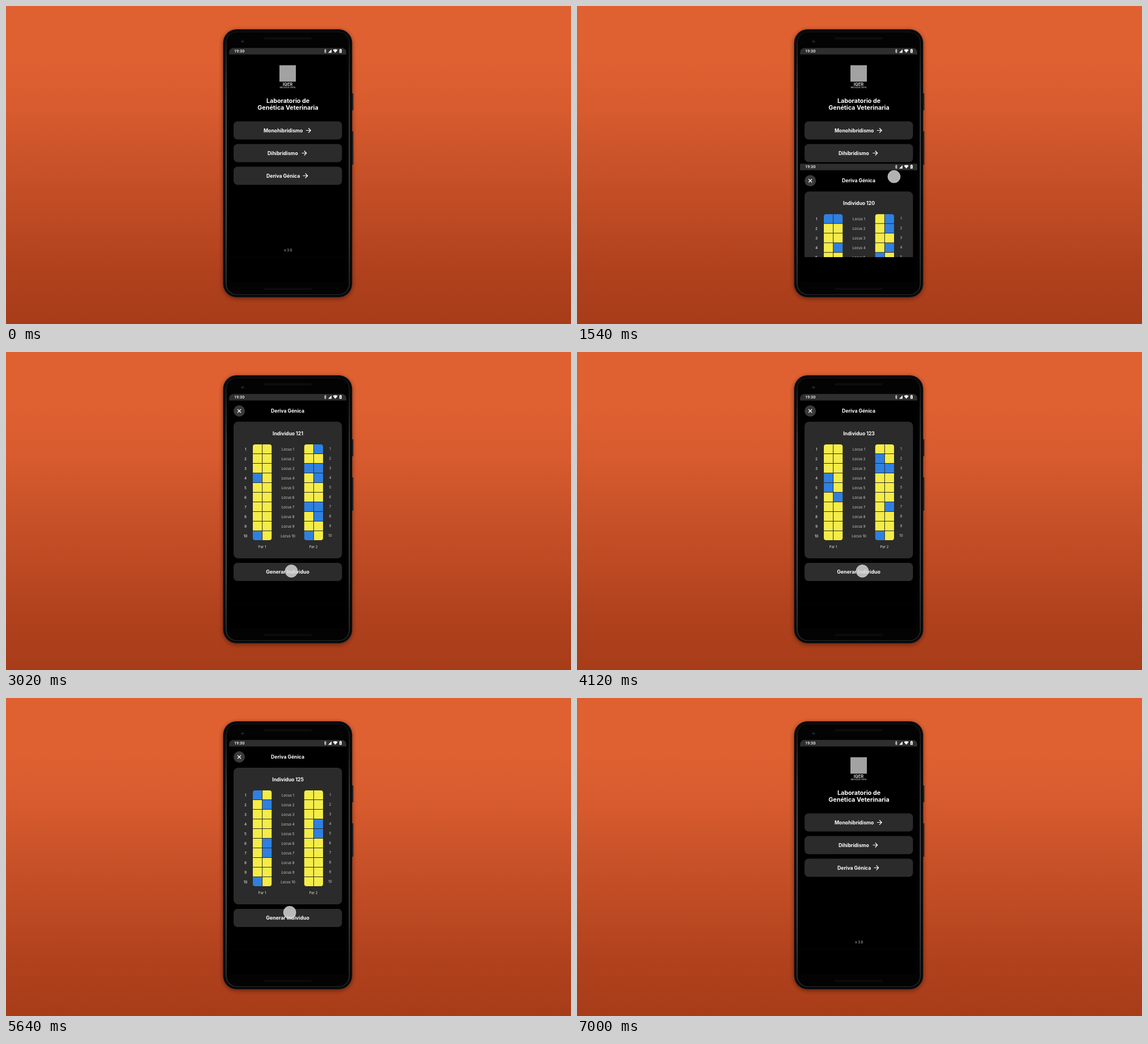
These frames come from a looping animation (998 px wide and 561 px high, 7.76 s). An HTML page with a canvas:

```html
<!DOCTYPE html>
<html lang="es">
<head>
<meta charset="utf-8">
<title>Laboratorio de Genética Veterinaria</title>
<style>
  html, body { margin: 0; width: 100%; height: 100%; overflow: hidden; background: #c24f27; }
  canvas { display: block; width: 998px; height: 561px; }
</style>
</head>
<body>
<canvas></canvas>
<script>
const LOOP = 7760, W = 998, H = 561;
const GREY = '#2b2b2b', YELLOW = '#f4ec48', BLUE = '#2f80e0';
const SCREEN = { x: 394, y: 74, w: 207, h: 369 };

// One digit per locus: 2 = left allele blue, 1 = right allele blue, 3 = both.
const PEOPLE = [
  { at: 0, pairs: ['3001012220', '1101200000'] },
  { at: 2780, pairs: ['0002000002', '1031003102'] },
  { at: 3400, pairs: ['0100200010', '0020100200'] },
  { at: 4000, pairs: ['0002210000', '0230001002'] },
  { at: 4640, pairs: ['1000020100', '0100020010'] },
  { at: 5310, pairs: ['2100011002', '0001100000'] }
];

// Touch path: arrival points, each reached between start and end.
const TOUCH = [
  { from: 340, to: 640, x: 560, y: 301 },
  { from: 2100, to: 2620, x: 504, y: 386.5 },
  { from: 5570, to: 6240, x: 406, y: 105.5 },
  { from: 6720, to: 7000, x: 380, y: 108 }
];

const canvas = document.querySelector('canvas');
const scale = window.devicePixelRatio || 1;
canvas.width = W * scale;
canvas.height = H * scale;
const c = canvas.getContext('2d');

// Cubic bezier (.4, 0, .2, 1), solved by bisection.
function ease(p) {
  if (p <= 0) return 0;
  if (p >= 1) return 1;
  let lo = 0, hi = 1, s;
  for (let i = 0; i < 20; i++) {
    s = (lo + hi) / 2;
    const x = 1.2 * (1 - s) ** 2 * s + 0.6 * (1 - s) * s * s + s ** 3;
    if (x < p) lo = s; else hi = s;
  }
  return 3 * (1 - s) * s * s + s ** 3;
}
const between = (t, from, to) => ease((t - from) / (to - from));

function box(x, y, w, h, r, fill) {
  c.beginPath();
  c.roundRect(x, y, w, h, r);
  c.fillStyle = fill;
  c.fill();
}

function disc(x, y, r, fill) {
  c.beginPath();
  c.arc(x, y, r, 0, 7);
  c.fillStyle = fill;
  c.fill();
}

function stroke(path, color, width) {
  c.strokeStyle = color;
  c.lineWidth = width;
  c.stroke(new Path2D(path));
}

function text(str, x, y, size, weight = 700, color = '#fff', align = 'center', font = 'Inter') {
  c.font = `${weight} ${size}px ${font}, sans-serif`;
  c.textAlign = align;
  c.fillStyle = color;
  c.fillText(str, x, y);
}

function gradient(x0, y0, x1, y1, ...colors) {
  const g = c.createLinearGradient(x0, y0, x1, y1);
  colors.forEach((color, i) => g.addColorStop(i / (colors.length - 1), color));
  return g;
}

function drawPhone() {
  c.fillStyle = gradient(0, 0, 0, H, '#df6132', '#df6132', '#d75b2e', '#c95229', '#bd4a23', '#b0411d', '#a83c19');
  c.fillRect(0, 0, W, H);
  box(610, 154, 3.5, 30, 1, '#20242a');
  box(610, 221, 3.5, 59, 1, '#20242a');
  c.save();
  c.shadowColor = 'rgba(40,10,0,.55)';
  c.shadowBlur = 9 * scale;
  c.shadowOffsetY = 2 * scale;
  box(383.5, 41, 228, 473, 24, '#15171a');
  c.restore();
  box(384.5, 42, 226, 470.5, 23, '#050505');
  box(387.5, 45, 220, 465, 20, gradient(0, 45, 0, 510, '#111', '#3b3d40', '#45474a', '#3b3d40', '#222'));
  box(390, 46.5, 215.5, 462, 18, '#030303');
  box(455, 55, 85, 4, 2, '#0d0d0e');
  box(455, 497.5, 85, 3, 1.5, '#0d0d0e');
  disc(418, 62.5, 3.5, '#080a0d');
  disc(417, 62.5, 1, '#1f5288');
  disc(419.3, 62.8, 0.8, '#1f5288');
  box(394, 74, 207, 413, 8, '#000');
  c.fillStyle = '#080808';
  c.fillRect(394, 442.5, 207, 1);
}

function drawStatusBar() {
  c.fillStyle = '#2e2e2e';
  c.fillRect(394, 74, 207, 11.5);
  text('19:30', 403, 82, 7.2, 500, '#fff', 'left', 'Roboto');
  stroke('M562 77.7l3.6 3.4-1.8 1.7v-6.6l1.8 1.7-3.6 3.4', '#fff', 0.8);
  c.fillStyle = '#fff';
  c.fill(new Path2D('M569 82.5h6v-6z'));
  c.fill(new Path2D('M581.7 82.6l-4.2-5q4.2-2.8 8.4 0z'));
  box(589, 76.6, 4, 6, 0.6, '#fff');
  box(590.2, 75.8, 1.6, 1, 0, '#fff');
  box(590.5, 78.2, 1, 2.8, 0, '#333');
}

function drawHome() {
  drawStatusBar();
  box(483, 104.5, 29, 29, 0, '#a2a2a2');
  text('IQER', 497.5, 140.8, 7.6, 700, '#c8c8c8');
  text('MEZQUILTEPA', 497.5, 145.4, 4, 600, '#b0b0b0');
  text('Laboratorio de', 498, 171, 10.75);
  text('Genética Veterinaria', 498, 183, 10.75);
  [['Monohibridismo', 455, 530], ['Dihibridismo', 462, 522.5], ['Deriva Génica', 460, 524.5]]
    .forEach(([label, x, arrow], i) => {
      const y = 219.5 + 40 * i;
      box(402, y - 16, 191.5, 32, 7, GREY);
      text(label, x, y + 3, 8.7, 700, '#fff', 'left');
      stroke(`M${arrow} ${y}h8.2m-4-4l4 4-4 4`, '#fff', 1.2);
    });
  text('v 3.0', 498.3, 433, 6, 400, '#ccc');
}

function drawPair(x, codes) {
  [...codes].forEach((code, row) => {
    const y = 163 + row * 17;
    for (const side of [0, 1]) {
      const r = [0, 0, 0, 0];
      if (row === 0) r[side] = 4;
      if (row === 9) r[3 - side] = 4;
      box(x + side * 17.1, y, 16.1, 16, r, code & (2 - side) ? BLUE : YELLOW);
    }
  });
}

function drawDrift(t) {
  c.fillStyle = '#000';
  c.fillRect(394, 74, 207, 369);
  drawStatusBar();
  disc(412, 104, 10, '#3a3a3a');
  stroke('M409 101l6 6m0-6l-6 6', '#fff', 1.2);
  text('Deriva Génica', 497.5, 107, 8.65);
  box(402, 123, 191.5, 241, 8, GREY);

  const index = PEOPLE.findLastIndex(p => t >= p.at);
  const person = PEOPLE[index];
  text('Individuo ' + (120 + index), 498, 147.2, 8.6);
  drawPair(436, person.pairs[0]);
  drawPair(526.8, person.pairs[1]);
  for (let i = 1; i <= 10; i++) {
    const y = 156.8 + i * 17;
    text(i, 423, y, 6.3, 500, '#ddd');
    text('Locus ' + i, 498, y, 6.15, 400, '#d0d0d0');
    text(i, 572.5, y - 1, 6.3, 400, '#c4c4c4');
  }
  text('Par 1', 452.5, 346, 6.1, 400, '#ddd');
  text('Par 2', 543, 346, 6.1, 400, '#ddd');

  const age = index ? t - person.at : 999;
  const glow = Math.max(0, 1 - age / 140) * 0.08;
  box(402, 372, 191.5, 32, 7, GREY);
  if (glow) box(402, 372, 191.5, 32, 7, `rgba(255,255,255,${glow})`);
  text('Generar Individuo', 497.5, 391, 8.8);
}

function drawTouch(t) {
  if (t < TOUCH[0].from || t >= TOUCH[3].to) return;
  let x = 612, y = 278;
  for (const move of TOUCH) {
    const p = between(t, move.from, move.to);
    x += (move.x - x) * p;
    y += (move.y - y) * p;
  }
  disc(x, y, 11, 'rgba(218,218,218,.82)');
  c.strokeStyle = 'rgba(235,235,235,.55)';
  c.lineWidth = 1;
  c.stroke();
}

function draw(t) {
  c.setTransform(scale, 0, 0, scale, 0, 0);
  drawPhone();
  c.save();
  c.beginPath();
  c.roundRect(SCREEN.x, SCREEN.y, SCREEN.w, SCREEN.h, [8, 8, 0, 0]);
  c.clip();
  drawHome();
  const shown = between(t, 1433, 1761) - between(t, 6510, 6840);
  if (shown > 0) {
    c.save();
    c.translate(0, SCREEN.h * (1 - shown));
    drawDrift(t);
    c.restore();
  }
  drawTouch(t);
  c.restore();
}

const start = performance.now();
function tick() {
  draw((performance.now() - start) % LOOP);
  requestAnimationFrame(tick);
}
tick();
</script>
</body>
</html>
```
